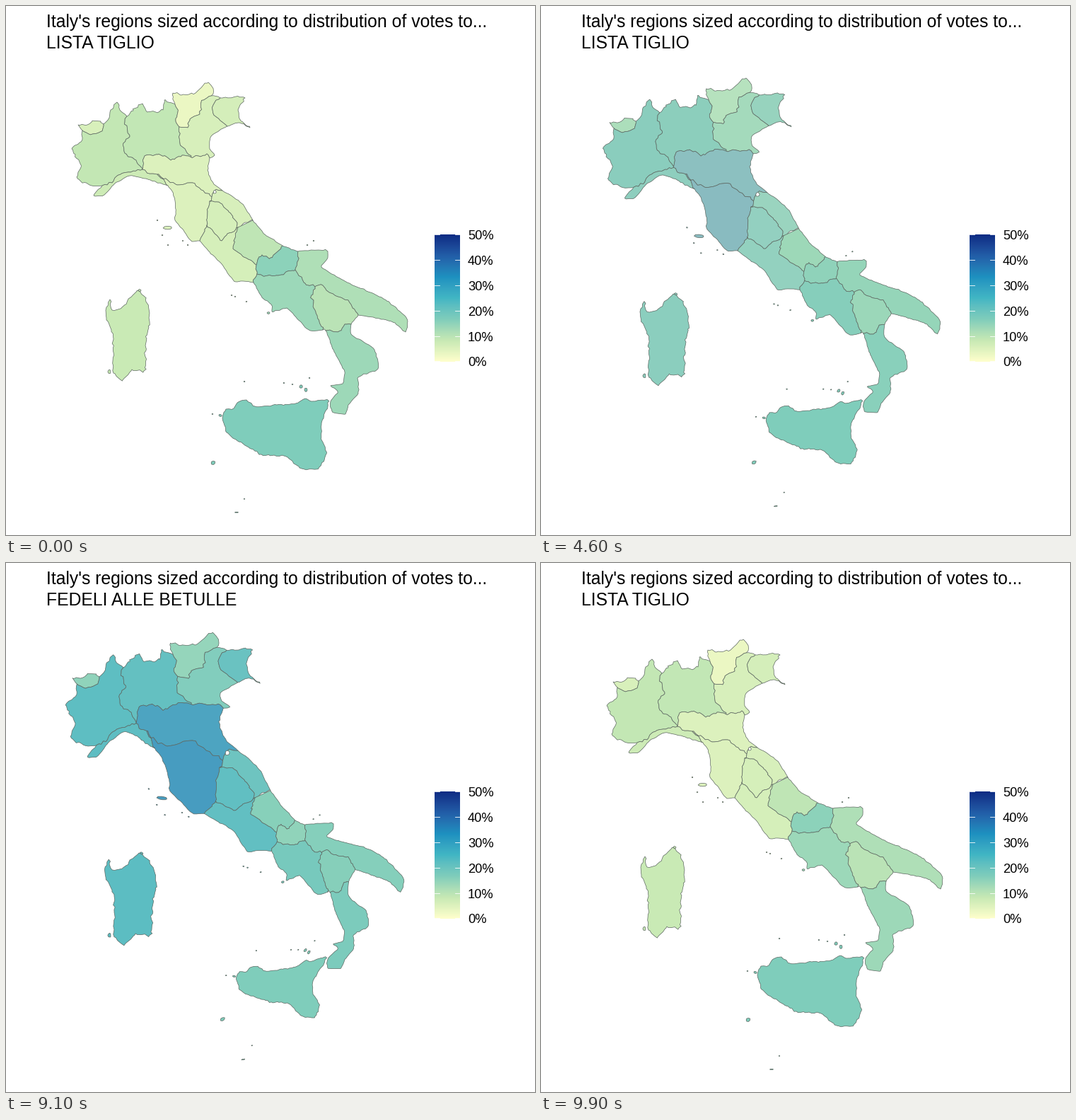
These frames come from a looping animation (748x748 px, 10000 ms). A matplotlib script:

```python
import numpy as np
import matplotlib.pyplot as plt
from matplotlib.animation import FuncAnimation
from matplotlib.collections import PolyCollection

SIZE, DPI, FRAMES, STEPS = 748, 100, 100, 9
TITLE = "Italy's regions sized according to distribution of votes to..."
PARTIES = "LISTA TIGLIO", "FEDELI ALLE BETULLE"
rng = np.random.default_rng(7)

# ---------- colour: blending happens in Lab-like space ----------
XYZ = np.array([[.4124, .3576, .1805], [.2126, .7152, .0722],
                [.0193, .1192, .9505]])
WHITE = XYZ.sum(axis=1)
STOPS = ["FFFFCC", "C7E9B4", "7FCDBB", "41B6C4", "1D91C0", "225EA8", "0C2C84"]


def to_lab(rgb):
    lin = np.where(rgb > .04045, ((rgb + .055) / 1.055) ** 2.4, rgb / 12.92)
    v = lin @ XYZ.T / WHITE
    return np.where(v > .008856, np.cbrt(v), 7.787 * v + 16 / 116)


def to_rgb(lab):
    v = np.where(lab > .2069, lab ** 3, (lab - 16 / 116) / 7.787)
    lin = np.clip((v * WHITE) @ np.linalg.inv(XYZ).T, 0, 1)
    rgb = np.where(lin > .0031308, 1.055 * lin ** (1 / 2.4) - .055, 12.92 * lin)
    return np.clip(rgb, 0, 1)


SCALE = to_lab(np.array([[int(s[k:k + 2], 16) / 255 for k in (0, 2, 4)]
                         for s in STOPS]))


def shade(percent):
    at = np.linspace(0, 50, len(STOPS))
    return np.stack([np.interp(percent, at, ch) for ch in SCALE.T], axis=-1)


# ---------- geometry ----------
rings, owners, votes = [], [], []


def arc(*xy, rough=.85, step=3.5, bend=.6):
    """Smooth curve through a few points, made jagged by seeded noise."""
    p = np.array(xy, float).reshape(-1, 2)
    s = np.r_[0, np.cumsum(np.hypot(*np.diff(p, axis=0).T))]
    slope = bend * np.gradient(p, s, axis=0)
    out = [p[:1]]
    for k, length in enumerate(np.diff(s)):
        n = max(2, round(length / step))
        u = np.linspace(0, 1, n + 1)[1:, None]
        h = u * u * (3 - 2 * u)
        curve = ((1 - h) * p[k] + h * p[k + 1]
                 + length * u * (1 - u) * ((1 - u) * slope[k] - u * slope[k + 1]))
        out.append(curve + rng.normal(0, rough, curve.shape) * (u < 1))
    return np.vstack(out)


def coast(*xy):
    return arc(*xy, rough=.4)


def region(first, second, *arcs):
    ring = arcs[0]
    for a in arcs[1:]:
        gap = np.linalg.norm(a[[0, -1]] - ring[-1], axis=1)
        ring = np.vstack([ring, a if gap[0] <= gap[1] else a[::-1]])
    owners.append(len(votes))
    votes.append((first, second))
    rings.append(ring)
    return len(votes) - 1


def islet(owner, x, y, rx=.8, ry=.7):
    a = np.arange(8) * np.pi / 4
    r = rng.uniform(.75, 1.2, 8)
    rings.append(np.c_[x + rx * r * np.cos(a), y + ry * r * np.sin(a)])
    owners.append(owner)


# north
aosta_out = arc(108, 176, 102, 168, 115, 168, 121, 164, 134, 163, 138, 167)
aosta_pie = arc(108, 176, 117, 181, 136, 177, 138, 167)
pie_north = arc(138, 167, 146, 158, 147, 150, 158, 137, 161, 147, 171, 156)
pie_west = arc(136, 254, 118, 253, 100, 242, 106, 228, 98, 210, 93, 202, 106, 192, 108, 176)
pie_lom = arc(171, 156, 168, 164, 175, 185, 166, 194, 168, 208, 184, 218, 193, 231)
pie_lig = arc(136, 254, 150, 250, 159, 239, 176, 235, 193, 231)
lom_north = arc(171, 156, 180, 148, 193, 138, 198, 148, 222, 147, 224, 133, 239, 139)
lom_tre = arc(239, 139, 243, 150, 240, 163, 245, 171)
lom_ven = arc(245, 171, 246, 194, 262, 214)
lom_emi = arc(193, 231, 196, 212, 215, 210, 238, 217, 249, 211, 262, 214)
tre_north = arc(239, 139, 236, 123, 248, 126, 268, 123, 286, 108, 293, 124, 290, 127)
tre_ven = arc(245, 171, 257, 172, 260, 160, 274, 153, 276, 136, 290, 127)
ven_north = arc(290, 127, 303, 130)
ven_fvg = arc(303, 130, 293, 140, 293, 152, 303, 162, 313, 170)
ven_coast = coast(313, 170, 289, 186, 288, 202, 295, 211, 288, 215)
ven_emi = arc(262, 214, 275, 213, 284, 209, 288, 215)
fvg_out = arc(303, 130, 338, 130, 328, 147, 330, 159, 345, 172, 330, 165, 313, 170)
emi_coast = coast(288, 215, 285, 232, 294, 252, 306, 261)
lig_coast = coast(229, 254, 204, 246, 175, 240, 152, 253, 139, 267, 124, 268, 136, 254)
lig_emi = arc(193, 231, 203, 237, 214, 238)
lig_tus = arc(214, 238, 229, 254)

# centre
emi_tus = arc(214, 238, 242, 253, 264, 250, 276, 260, 291, 270)
emi_mar = arc(291, 270, 294, 262, 306, 261)
tus_coast = coast(229, 254, 235, 262, 240, 291, 239, 303, 251, 317, 263, 333, 274, 332)
tus_mar = arc(291, 270, 288, 276)
tus_umb = arc(288, 276, 285, 290, 284, 310)
tus_laz = arc(284, 310, 279, 322, 274, 332)
umb_mar = arc(288, 276, 301, 277, 315, 291, 327, 309, 325, 316)
umb_laz = arc(284, 310, 293, 319, 305, 332, 313, 322, 325, 316)
mar_coast = coast(306, 261, 333, 279, 349, 303)
mar_abr = arc(349, 303, 335, 308, 328, 313)
mar_laz = arc(325, 316, 328, 313)
abr_coast = coast(349, 303, 366, 323, 391, 339)
abr_laz = arc(328, 313, 321, 343, 341, 357, 354, 366)
abr_mol = arc(354, 366, 362, 352, 374, 356, 391, 339)
laz_mol = arc(354, 366, 355, 379)
laz_cam = arc(355, 379, 350, 391)
laz_coast = coast(350, 391, 335, 389, 325, 390, 306, 366, 288, 348, 274, 332)

# south
mol_coast = coast(391, 339, 413, 347)
mol_pug = arc(413, 347, 413, 360, 409, 373)
mol_cam = arc(355, 379, 382, 381, 409, 373)
cam_pug = arc(409, 373, 423, 392, 437, 397)
cam_bas = arc(437, 397, 432, 409, 437, 430, 448, 458)
cam_coast = coast(350, 391, 364, 414, 375, 422, 376, 432, 397, 427, 410, 440,
                  430, 459, 448, 458)
pug_coast = coast(413, 347, 455, 348, 455, 356, 446, 367, 470, 384, 543, 420,
                  568, 446, 565, 461, 550, 448, 528, 442, 498, 437)
pug_bas = arc(437, 397, 446, 394, 457, 405, 485, 418, 498, 437)
bas_gulf = coast(498, 437, 488, 450)
bas_cal = arc(488, 450, 479, 450, 474, 459, 452, 459)
bas_west = arc(448, 458, 452, 459)
cal_coast = coast(488, 450, 488, 464, 503, 473, 521, 486, 526, 513, 498, 525,
                  498, 548, 484, 564, 480, 577, 461, 573, 459, 559, 469, 545,
                  459, 537, 476, 534, 479, 520, 464, 489, 452, 459)
sicily_out = arc(306, 583, 311, 570, 322, 569, 327, 561, 340, 557, 352, 566, 383, 564,
                 413, 561, 423, 555, 432, 559, 455, 557, 446, 592, 447, 615, 453, 630,
                 442, 654, 415, 653, 396, 637, 361, 634, 343, 624, 312, 603, 306, 583,
                 rough=.6)
sardinia_out = arc(142, 426, 147, 415, 150, 430, 164, 426, 188, 403, 195, 410, 203, 434,
                   203, 446, 197, 480, 195, 516, 178, 514, 165, 529, 152, 519, 152, 490,
                   149, 458, 142, 444, 142, 426, rough=1)

# vote shares in percent for both parties
region(5.8, 16, aosta_out, aosta_pie)
region(8.8, 24, aosta_pie, pie_north, pie_lom, pie_lig, pie_west)
region(9, 23, lom_north, lom_tre, lom_ven, lom_emi, pie_lom)
region(3, 15.7, tre_north, tre_ven, lom_tre)
region(6, 18.3, tre_ven, ven_north, ven_fvg, ven_coast, ven_emi, lom_ven)
region(6.4, 22.5, fvg_out, ven_fvg)
region(7.5, 24.3, lig_coast, pie_lig, lig_emi, lig_tus)
region(5.2, 31, lom_emi, ven_emi, emi_coast, emi_mar, emi_tus, lig_emi)
tuscany = region(5.3, 33, tus_coast, tus_laz, tus_umb, tus_mar, emi_tus, lig_tus)
region(6.2, 24, tus_umb, umb_laz, umb_mar)
region(5.9, 22, mar_coast, mar_abr, mar_laz, umb_mar, tus_mar, emi_mar)
lazio = region(6.2, 23.8, tus_laz[::-1], umb_laz, mar_laz, abr_laz, laz_mol,
               laz_cam, laz_coast)
region(9.4, 16.7, abr_coast, abr_mol, abr_laz)
region(15.3, 14.8, mol_coast, mol_pug, mol_cam, laz_mol, abr_mol)
campania = region(13.5, 18.8, mol_cam, cam_pug, cam_bas, cam_coast, laz_cam)
puglia = region(11.3, 16.7, pug_coast, pug_bas, cam_pug, mol_pug)
region(10, 16.7, pug_bas, bas_gulf, bas_cal, bas_west, cam_bas)
region(13.4, 18, cal_coast, bas_cal)
sicily = region(16.7, 16.7, sicily_out)
sardinia = region(8, 24.5, sardinia_out)

islet(tuscany, 229, 314, 6, 2.5)
islet(sicily, 293, 646, 3, 2.2)
islet(sicily, 326, 716, 2.6, .7)
islet(sicily, 303, 579, 2, 1.6)
islet(sicily, 417, 538, 2.2, 2)
islet(sicily, 424, 543, 1.8, 2.8)
islet(campania, 371, 434, 2.2, 1.5)
islet(sardinia, 146, 517, 2, 3)
islet(sardinia, 189, 402, 2, 1.4)
for owner, dots in [(tuscany, [(214, 303), (221, 324), (229, 338), (250, 332), (257, 338)]),
                    (lazio, [(319, 409), (324, 411), (340, 418)]),
                    (puglia, [(426, 338), (435, 332)]),
                    (sicily, [(292, 577), (337, 531), (337, 697), (393, 533),
                              (405, 535), (429, 526)])]:
    for dot in dots:
        islet(owner, *dot)
islet(len(votes), 295, 263, 2, 2.4)     # enclave, left white

# ---------- second layout: thin-plate spline through key places ----------
MAINLAND = [(102, 168, 93, 162), (158, 137, 152, 130), (93, 203, 83, 202),
            (124, 268, 114, 275), (193, 138, 188, 127), (236, 123, 232, 112),
            (286, 108, 293, 97), (338, 130, 350, 122), (345, 172, 361, 170),
            (289, 187, 305, 185), (288, 215, 310, 204), (193, 231, 183, 226),
            (262, 214, 262, 198), (229, 254, 208, 263), (239, 303, 231, 325),
            (274, 332, 281, 357), (306, 261, 331, 266), (284, 310, 298, 340),
            (325, 316, 352, 337), (349, 303, 377, 324), (391, 339, 411, 367),
            (355, 379, 387, 396), (325, 390, 346, 411), (321, 344, 349, 357),
            (413, 347, 424, 373), (457, 349, 466, 373), (566, 455, 559, 460),
            (498, 437, 493, 433), (448, 458, 456, 466), (503, 473, 494, 482),
            (526, 513, 510, 514), (459, 538, 463, 540), (470, 577, 463, 574)]
ISLANDS = [(306, 583, 328, 588), (340, 557, 358, 572), (395, 563, 401, 574),
           (455, 557, 452, 557), (446, 592, 432, 593), (442, 654, 436, 641),
           (372, 634, 386, 618), (142, 426, 140, 430), (188, 403, 191, 412),
           (203, 446, 214, 454), (165, 529, 168, 541), (293, 646, 308, 645)]
PINS = np.array(MAINLAND + ISLANDS) / SIZE
KNOTS, GOALS = PINS[:, :2], PINS[:, 2:]


def kernel(p):
    d2 = ((p[:, None] - KNOTS) ** 2).sum(axis=2)
    return d2 * np.log(d2 + 1e-12)


def affine(p):
    return np.c_[np.ones(len(p)), p]


system = np.block([[kernel(KNOTS) + 1e-4 * np.eye(len(KNOTS)), affine(KNOTS)],
                   [affine(KNOTS).T, np.zeros((3, 3))]])
weights = np.linalg.solve(system, np.vstack([GOALS - KNOTS, np.zeros((3, 2))]))


def warp(p):
    q = p / SIZE
    return p + SIZE * np.hstack([kernel(q), affine(q)]) @ weights


warped = [warp(r) for r in rings]
tints = shade(np.array(votes).T)

# ---------- stage ----------
plt.rcParams["font.family"] = "Liberation Sans"
fig = plt.figure(figsize=(SIZE / DPI, SIZE / DPI), dpi=DPI, facecolor="white")
ax = fig.add_axes([0, 0, 1, 1])


def write(x, y, text, px, va="baseline"):
    return ax.text(x, y, text, fontsize=px * 72 / DPI, color="black", va=va)


write(57.5, 30, TITLE, 24.7)
party = write(57.5, 60, PARTIES[0], 24.7)

ramp = to_rgb(shade(np.linspace(50, 0, 256)))[:, None]
ax.imshow(ramp, extent=(606, 642, 502.5, 323), aspect="auto", interpolation="bilinear")
for k in range(6):
    y = 502.3 - 35.8 * k
    ax.plot([606, 613], [y, y], color="white", lw=.6)
    ax.plot([635, 642], [y, y], color="white", lw=.6)
    write(653, y + .5, f"{10 * k}%", 18.3, "center_baseline")

shapes = PolyCollection(rings, edgecolors="#5c6660", linewidths=.5, joinstyle="round")
ax.add_collection(shapes)
ax.set_xlim(0, SIZE)
ax.set_ylim(SIZE, 0)
ax.axis("off")


def draw(i):
    t = np.clip((i - 41) / STEPS, 0, 1) - np.clip((i - 90) / STEPS, 0, 1)
    shapes.set_verts([(1 - t) * a + t * b for a, b in zip(rings, warped)])
    fills = np.vstack([to_rgb((1 - t) * tints[0] + t * tints[1]), np.ones(3)])
    shapes.set_facecolor(fills[owners])
    party.set_text(PARTIES[50 <= i < 99])
    return shapes, party


anim = FuncAnimation(fig, draw, frames=FRAMES, interval=100, repeat=True)
plt.show()
```
